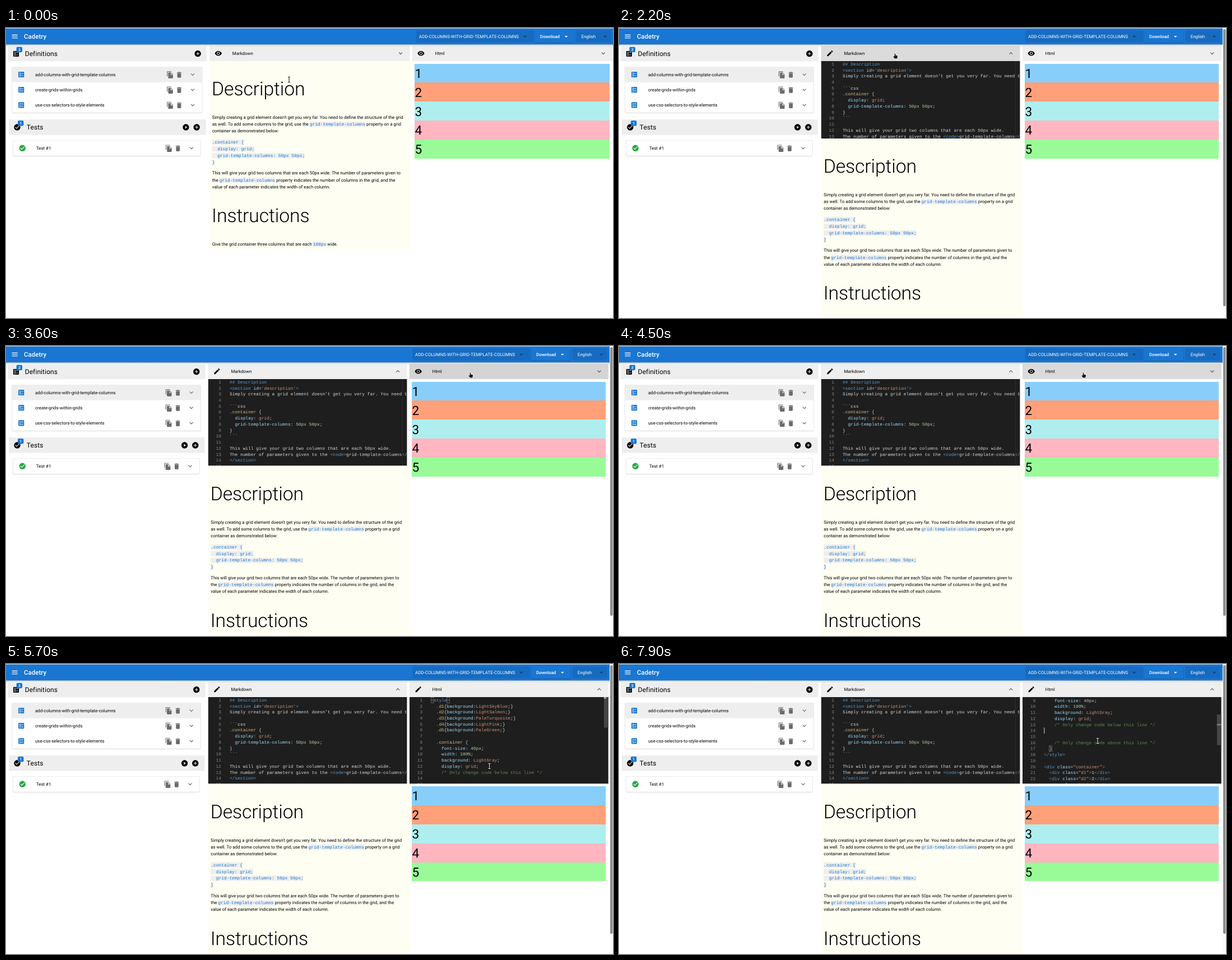
An HTML page with a canvas that plays this animation: 1083 by 517 pixels, repeating every 8000 ms.

```html
<!DOCTYPE html>
<html lang="en">
<head>
<meta charset="utf-8">
<title>Lesson editor</title>
<style>
html, body { margin: 0; width: 100%; height: 100%; overflow: hidden; background: #fff; }
canvas { display: block; width: 1083px; height: 517px; }
</style>
</head>
<body>
<canvas id="stage"></canvas>
<script>
const W = 1083, H = 517, LOOP = 8000;
const canvas = document.getElementById('stage');
const ctx = canvas.getContext('2d');
const ratio = window.devicePixelRatio || 1;
canvas.width = W * ratio;
canvas.height = H * ratio;
ctx.textRendering = 'geometricPrecision';

const SCALE = 0.5641;          // interface pixels to stage pixels
const BODY = 14 * SCALE;
const LINE = 19 * SCALE;
const EDITOR_TOP = 59, EDITOR_H = 154.6;
const BLUE = '#1976d2';
const SANS = 'Roboto, sans-serif';
const MONO = '"Liberation Mono", monospace';

const DISC = 'M12 2C6.48 2 2 6.48 2 12s4.48 10 10 10 10-4.48 10-10S17.52 2 12 2z';
const ICON = {
  menu: 'M3 18h18v-2H3zm0-5h18v-2H3zm0-7v2h18V6z',
  drop: 'M7 10l5 5 5-5z',
  chevron: 'M16.59 8.59L12 13.17 7.41 8.59 6 10l6 6 6-6z',
  eye: 'M12 4.5C7 4.5 2.73 7.61 1 12c1.73 4.39 6 7.5 11 7.5s9.27-3.11 11-7.5c-1.73-4.39-6-7.5-11-7.5zM12 17c-2.76 0-5-2.24-5-5s2.24-5 5-5 5 2.24 5 5-2.24 5-5 5zm0-8c-1.66 0-3 1.34-3 3s1.34 3 3 3 3-1.34 3-3-1.34-3-3-3z',
  pencil: 'M3 17.25V21h3.75L17.81 9.94l-3.75-3.75zM20.71 7.04c.39-.39.39-1.02 0-1.41l-2.34-2.34c-.39-.39-1.02-.39-1.41 0l-1.83 1.83 3.75 3.75z',
  add: DISC + 'm5 11h-4v4h-2v-4H7v-2h4V7h2v4h4z',
  play: DISC + 'm-2 14.5v-9l6 4.5z',
  check: DISC + 'm-2 15l-5-5 1.41-1.41L10 14.17l7.59-7.59L19 8z',
  bin: 'M6 19c0 1.1.9 2 2 2h8c1.1 0 2-.9 2-2V7H6zM19 4h-3.5l-1-1h-5l-1 1H5v2h14z',
  copy: 'M16 1H4c-1.1 0-2 .9-2 2v14h2V3h12zm-1 4l6 6v10c0 1.1-.9 2-2 2H8c-1.1 0-2-.9-2-2V7c0-1.1.9-2 2-2zm-1 7h5.5L14 6.5z',
  ballot: 'M13 9.5h5v-2h-5zm0 7h5v-2h-5zm6 4.5H5c-1.1 0-2-.9-2-2V5c0-1.1.9-2 2-2h14c1.1 0 2 .9 2 2v14c0 1.1-.9 2-2 2zM6 11h5V6H6zm1-4h3v3H7zM6 18h5v-5H6zm1-4h3v3H7z'
};
for (const name in ICON) ICON[name] = new Path2D(ICON[name]);
const HAND = new Path2D('M-1.4 -4.2Q-.5 -5 .2 -4V-1.6L3.2 -.8Q4.2 -.4 4 .8L3.2 4.4H-1.2L-3.8 1Q-3.6 -.2 -2.4 .3L-1.4 1z');
const ARROW = new Path2D('M0 0V9L2.2 7.2 3.6 10 4.8 9.4 3.5 6.6H6.4z');

const MARKDOWN = `## Description
<section id='description'>
Simply creating a grid element doesn't get you very far. You need to define

\`\`\`css
.container {
  display: grid;
  grid-template-columns: 50px 50px;
}
\`\`\`

This will give your grid two columns that are each 50px wide.
The number of parameters given to the <code>grid-template-columns</code>
</section>
`.split('\n');

const COLORS = ['LightSkyBlue', 'LightSalmon', 'PaleTurquoise', 'LightPink', 'PaleGreen'];
const HTML = [
  '<style>',
  ...COLORS.map((c, i) => `  .d${i + 1}{background:${c};}`),
  '',
  '  .container {',
  '    font-size: 40px;',
  '    width: 100%;',
  '    background: LightGray;',
  '    display: grid;',
  '    /* Only change code below this line */',
  '', '',
  '    /* Only change code above this line */',
  '  }',
  '</style>',
  '',
  '<div class="container">',
  ...COLORS.map((c, i) => `  <div class="d${i + 1}">${i + 1}</div>`),
  '</div>'
];

const TOKEN = /(?<note>\/\*.*\*\/)|(?<tag>^## .*|(?<=<\/?)[a-z]+)|(?<edge><\/?|>)|(?<name>\b(?:id|class)(?==)|[a-z-]+(?=:))|(?<text>'[^']*'|"[^"]*"|\b(?:grid|Light\w+|Pale\w+)(?=;))|(?<rule>\.[a-z]\w*(?=\s*\{))|(?<num>\d+(?:px|%)(?=;| \d))|(?<plain>[\w-]+|\S)/g;
const INK = { note: '#608b4e', tag: '#569cd6', name: '#9cdcfe', text: '#ce9178', rule: '#d7ba7d', num: '#b5cea8', plain: '#d4d4d4' };

// Stepped values: [time, ...value]
const MOUSE = [
  [0, 505, 92, 'beam'], [600, 503, 80, 'beam'], [700, 500, 54, 'hand'], [800, 497, 25, 'arrow'],
  [900, 496, 6, 'arrow'], [1000, 496, 12, 'arrow'], [1100, 495, 24, 'arrow'], [1200, 494, 45, 'hand'],
  [1300, 493, 50, 'hand'], [3600, 829, 52, 'hand'], [5300, 849, 172, 'beam'], [5500, 865, 193, 'beam'],
  [5700, 862.5, 182, 'beam'], [6300, 838, 149, 'beam'], [6500, 810, 123, 'beam'],
  [6700, 809, 121, 'beam'], [7400, 854, 137, 'beam']
];
const MD_SHADE = [[0, '#eee'], [700, '#dedede'], [800, '#eee'], [1200, '#dedede'], [1300, '#dadada'],
  [1900, '#d6d6d6'], [2000, '#d2d2d2'], [2100, '#d6d6d6'], [2200, '#dbdbdb'], [3600, '#efefef']];
const HTML_SHADE = [[0, '#eee'], [3600, '#d4d4d4'], [3700, '#dadada'], [4700, '#dcdcdc'], [5300, '#eee']];
const MD_OPEN = [[0, 0], [2100, 0.33], [2200, 0.893], [2300, 0.985], [2400, 1]];
const MD_TURN = [[0, 0], [2000, 90], [2100, 160], [2200, 180]];

function at(keys, t) {
  let hit = keys[0];
  for (const key of keys) if (key[0] <= t) hit = key;
  return hit;
}

function rect(x, y, x2, y2, color) {
  ctx.fillStyle = color;
  ctx.fillRect(x, y, x2 - x, y2 - y);
}

function round(x, y, x2, y2, r, color) {
  ctx.fillStyle = color;
  ctx.beginPath();
  ctx.roundRect(x, y, x2 - x, y2 - y, r);
  ctx.fill();
}

function font(size = BODY, weight = 400, family = SANS, spacing = 0) {
  ctx.font = `${weight} ${size}px ${family}`;
  ctx.letterSpacing = spacing + 'px';
}

function text(str, x, y, color = '#000') {
  ctx.fillStyle = color;
  ctx.fillText(str, x, y);
}

function icon(name, x, y, color = '#000', turn = 0) {
  ctx.save();
  ctx.translate(x, y);
  ctx.rotate(turn * Math.PI / 180);
  ctx.scale(SCALE, SCALE);
  ctx.translate(-12, -12);
  ctx.fillStyle = color;
  ctx.fill(ICON[name], 'evenodd');
  ctx.restore();
}

function clipTo(x, y, x2, y2) {
  ctx.beginPath();
  ctx.rect(x, y, x2 - x, y2 - y);
  ctx.clip();
}

function topBar(right) {
  rect(0, 0, W, 1, '#c4d3e4');
  const end = right ? 1077 : W;
  rect(0, 1, end, 29.4, BLUE);
  const shade = ctx.createLinearGradient(0, 29.4, 0, 33);
  shade.addColorStop(0, 'rgba(0,0,0,.22)');
  shade.addColorStop(1, 'rgba(0,0,0,0)');
  rect(0, 29.4, end, 33, shade);
  icon('menu', 15.6, 15.2, '#fff');
  font(11.4, 500, SANS, 0.08);
  text('Cadetry', 32, 19.2, '#fff');
  const s = right * 0.94;
  round(732 - s, 4, 942 - s, 26, 2, '#166bc0');
  round(1017 - s, 4, 1080 - s, 26, 2, '#166bc0');
  round(943 - s, 5, 1014.5 - s, 27, 2, 'rgba(0,0,0,.15)');
  round(943.5 - s, 4.5, 1014 - s, 25.7, 2, BLUE);
  font(BODY, 400, SANS, 0.06);
  text('ADD-COLUMNS-WITH-GRID-TEMPLATE-COLUMNS', 736.7 - s, 18, '#fff');
  font();
  text('English', 1026.5 - s, 18, '#fff');
  font(BODY, 500);
  text('Download', 952.8 - s, 18, '#fff');
  icon('drop', 926 - s, 15.2, '#0d3c6c');
  icon('drop', 999.5 - s, 15.2, '#fff');
  icon('drop', 1069 - s, 15.2, '#0d3c6c');
}

function badge(x, y, label) {
  round(x, y, x + 10.4, y + 9.4, 2, BLUE);
  font(6.7, 500);
  text(label, x + 3.3, y + 7, '#fff');
}

function card(x, y, x2, y2) {
  round(x - 0.6, y - 0.3, x2 + 0.6, y2 + 1, 2.4, '#d9d9d9');
  round(x, y, x2, y2, 2, '#fff');
}

function rowTools(x, y) {
  icon('copy', x, y + 0.5, '#6b6b6b');
  icon('bin', x + 16.2, y + 0.4, '#6b6b6b');
  icon('chevron', x + 40.3, y, '#666');
}

function sidebar(s) {
  rect(3, 33, 358 - s, 59.3, '#eee');
  icon('ballot', 18, 46);
  badge(18.6, 33.8, '3');
  font(12, 400, SANS, 0.09);
  text('Definitions', 33.7, 50.2);
  icon('add', 342.2 - s, 45.7);

  card(11, 69.2, 349.7 - s, 151);
  rect(11, 69.2, 349.7 - s, 96.7, '#eee');
  ['add-columns-with-grid-template-columns', 'create-grids-within-grids', 'use-css-selectors-to-style-elements']
    .forEach((label, i) => {
      const y = 83 + i * 27.2;
      icon('ballot', 27.2, y, BLUE);
      font();
      text(label, 52, y + 2.8);
      rowTools(292.8 - s, y);
    });

  rect(5, 163, 357 - s, 190.6, '#eee');
  icon('check', 20, 177);
  badge(21, 165, '1');
  font(12, 400, SANS, 0.09);
  text('Tests', 36.8, 181.2);
  icon('play', 321 - s, 177);
  icon('add', 340.2 - s, 177);

  card(13, 200.4, 347.4 - s, 228);
  icon('check', 29.3, 214.2, '#28a745');
  font();
  text('Test #1', 54, 217);
  rowTools(290.6 - s, 214.2);
}

function panelHead(x, x2, label, shade, open, turn) {
  rect(x, 32, x2, EDITOR_TOP, shade);
  icon(open ? 'pencil' : 'eye', x + 15.8, 45.2);
  font();
  text(label, x + 40.8, 47.9);
  icon('chevron', x2 - 16.4, 45.2, '#555', turn);
}

// Text between backticks is set as code
function flow(str, x, y) {
  str.split('`').forEach((part, i) => {
    font(BODY, 400, i % 2 ? MONO : SANS);
    const w = ctx.measureText(part).width;
    if (i % 2) rect(x, y - 7, x + w, y + 2.4, '#eee');
    text(part, x, y, i % 2 ? BLUE : '#000');
    x += w;
  });
}

function article(x, dy) {
  rect(x - 4, EDITOR_TOP + dy, x + 354.5, 395 + dy, '#fefef2');
  font(60 * SCALE, 300, SANS, -0.16);
  text('Description', x - 0.6, 120 + dy);
  text('Instructions', x - 0.6, 346.2 + dy);
  [
    [161.9, "Simply creating a grid element doesn't get you very far. You need to define the structure of the grid"],
    [174, 'as well. To add some columns to the grid, use the `grid-template-columns` property on a grid'],
    [186.1, 'container as demonstrated below:'],
    [206, '`.container {`'],
    [217.9, '`  display: grid;`'],
    [229.8, '`  grid-template-columns: 50px 50px;`'],
    [241.7, '`}`'],
    [261.4, 'This will give your grid two columns that are each 50px wide. The number of parameters given to'],
    [273.6, 'the `grid-template-columns` property indicates the number of columns in the grid, and the'],
    [285.8, 'value of each parameter indicates the width of each column.'],
    [387.6, 'Give the grid container three columns that are each `100px` wide.']
  ].forEach(([y, line]) => flow(line, x, y + dy));
}

function bands(x, x2, top) {
  COLORS.forEach((color, i) => {
    const y = top + i * 33.85;
    rect(Math.round(x), Math.round(y), Math.round(x2), Math.round(y + 33.85), color);
    font(40 * SCALE);
    text(i + 1, x + 0.4, y + 25.2);
  });
}

function code(lines, x, scroll, edge) {
  font(BODY, 400, MONO);
  const cw = ctx.measureText('0').width;
  lines.forEach((line, i) => {
    const y = EDITOR_TOP + i * LINE - scroll + 7.9;
    if (y < EDITOR_TOP - 4 || y > EDITOR_TOP + EDITOR_H + 9) return;
    const no = String(i + 1);
    text(no, x - 15 - no.length * cw, y, '#858585');
    for (const m of line.matchAll(TOKEN)) {
      const kind = Object.keys(m.groups).find(k => m.groups[k] !== undefined);
      text(m[0], x + m.index * cw, y, kind === 'edge' ? edge : INK[kind]);
    }
  });
  return cw;
}

function bracket(x, y, w) {
  ctx.strokeStyle = '#888';
  ctx.lineWidth = 0.6;
  ctx.strokeRect(x, y, w, LINE - 0.6);
}

function markdownEditor(x, h) {
  ctx.save();
  clipTo(x, EDITOR_TOP, x + 355, EDITOR_TOP + h);
  rect(x, EDITOR_TOP, x + 355, EDITOR_TOP + h, '#1e1e1e');
  code(MARKDOWN, x + 38.4, 0, INK.tag);
  rect(x + 346.6, EDITOR_TOP, x + 347.1, EDITOR_TOP + h, '#3a3a3a');
  ctx.restore();
}

function htmlEditor(x, x2, t) {
  const bottom = EDITOR_TOP + EDITOR_H;
  const scroll = t >= 5900 ? 85 : 0;
  const focus = t >= 6900;
  const left = x + 38.4;
  const row = n => EDITOR_TOP + (n - 1) * LINE - scroll;
  ctx.save();
  clipTo(x, EDITOR_TOP, x2, bottom);
  rect(x, EDITOR_TOP, x2, bottom, '#1e1e1e');
  const cw = code(HTML, left, scroll, '#808080');
  if (!focus) {
    bracket(left, row(1) + 0.3, cw);
    bracket(left + 6 * cw, row(1) + 0.3, cw);
  } else if (t >= 7100) {
    bracket(left + 2 * cw, row(17) + 0.3, cw);
  }
  if (t >= 5300) {
    const y = EDITOR_TOP + scroll * 0.365;
    rect(x2 - 8, y, x2, y + 54.5, '#454545');
  }
  if (focus) rect(x2 - 8, 107.6, x2, 109, '#a0a0a0');
  else rect(x2 - 8, EDITOR_TOP, x2 - 4, 62, '#a0a0a0');
  if (focus && (t - 6900) % 1000 < 500) rect(left, row(14), left + 1.1, row(15), '#c8c8c8');
  ctx.restore();
}

function pointer([, x, y, kind], dark) {
  ctx.save();
  ctx.translate(x, y);
  ctx.lineJoin = 'round';
  if (kind === 'beam') {
    const stroke = (color, width) => {
      ctx.strokeStyle = color;
      ctx.lineWidth = width;
      ctx.beginPath();
      ctx.moveTo(-2, -4.5); ctx.lineTo(2, -4.5);
      ctx.moveTo(0, -4.5); ctx.lineTo(0, 4.5);
      ctx.moveTo(-2, 4.5); ctx.lineTo(2, 4.5);
      ctx.stroke();
    };
    stroke(dark ? '#111' : '#cfcfcf', 2.6);
    stroke(dark ? '#f0f0f0' : '#444', 1);
  } else {
    const shape = kind === 'hand' ? HAND : ARROW;
    ctx.strokeStyle = '#fff';
    ctx.lineWidth = 1.4;
    ctx.stroke(shape);
    ctx.fillStyle = '#111';
    ctx.fill(shape);
  }
  ctx.restore();
}

function draw(t) {
  ctx.setTransform(ratio, 0, 0, ratio, 0, 0);
  rect(0, 0, W, H, '#fff');
  const grow = at(MD_OPEN, t)[1] * EDITOR_H;
  const scrolls = grow > 120;
  const s = scrolls ? 2.4 : 0;
  const mdX = 363 - s, htmlX = 724.6 - 2 * s;
  const mdEnd = 720.4 - 2 * s, htmlEnd = 1082 - 3 * s;
  const htmlOpen = t >= 4700;

  sidebar(s);
  article(367.7 - s, grow);
  if (grow) markdownEditor(mdX, grow);
  panelHead(mdX, mdEnd, 'Markdown', at(MD_SHADE, t)[1], t >= 2000, at(MD_TURN, t)[1]);

  bands(729 - 2 * s, 1077 - 3 * s, !htmlOpen ? 63.6 : t < 4900 ? 225.4 : 218.2);
  if (htmlOpen) htmlEditor(htmlX, htmlEnd, t);
  panelHead(htmlX, htmlEnd, 'Html', at(HTML_SHADE, t)[1], htmlOpen, htmlOpen ? 180 : 0);

  topBar(3 * s);
  if (scrolls) {
    rect(1077, 0, W, H, '#fafafa');
    round(1078, 2, 1082.4, 496 - (grow - 138) * 0.9, 2.2, '#8b8b8b');
  }
  pointer(at(MOUSE, t), t >= 5300);
}

const start = performance.now();
function tick(now) {
  draw(Math.max(0, now - start) % LOOP);
  requestAnimationFrame(tick);
}
draw(0);
requestAnimationFrame(tick);
</script>
</body>
</html>
```
